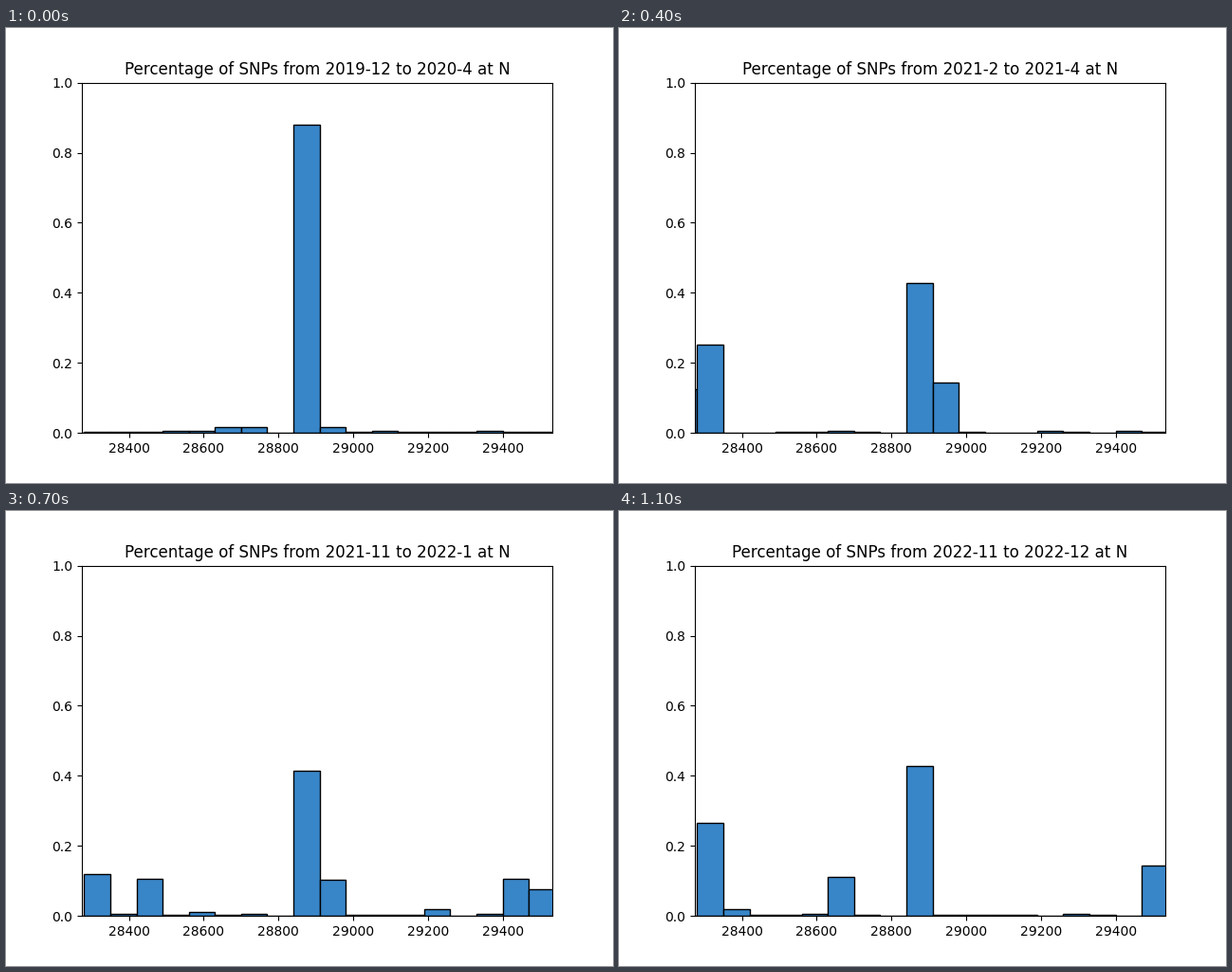
A matplotlib script for the animation above (1.2 s loop, 640 by 480 pixels).

```python
import numpy as np
import matplotlib.pyplot as plt
from matplotlib.animation import FuncAnimation

FRAMES, LOOP_MS = 12, 1200
GENE_START, GENE_END = 28274, 29533
BIN = 70
edges = np.arange(28210, GENE_END, BIN)


def pulse(peak, height):
    """Rise from zero to a peak and fall back within two periods each way."""
    return [(peak - 2, 0), (peak, height), (peak + 2, 0)]


# Main mutation sites: left bin edge -> (step, share) points, linear between
SITES = {
    28210: pulse(4, 0.125),
    28280: [(2, 0), (4, 0.252), (6, 0.033), (8, 0.204), (11, 0.265)],
    28350: [(8, 0), (10, 0.035), (11, 0.02)],
    28420: pulse(6, 0.211),
    28560: pulse(6, 0.022),
    28630: [(0, 0.016), (2, 0), (8, 0), (10, 0.025), (11, 0.111)],
    28700: pulse(0, 0.016),
    28840: [(0, 0.88), (2, 0.983), (4, 0.428), (6, 0.217), (8, 0.61),
            (10, 0.485), (11, 0.428)],
    28910: [(0, 0.016), (2, 0.006), (4, 0.144), (6, 0.206), (8, 0.003), (10, 0)],
    29190: pulse(6, 0.039),
    29400: pulse(6, 0.214),
    29470: [(6, 0.003), (8, 0.152), (10, 0.16), (11, 0.144)],
}


def month(year, m):
    return year * 12 + m - 1


def label(n):
    return f"{n // 12}-{n % 12 + 1}"


def period(step):
    start = month(2020, 2) + 3 * step if step else month(2019, 12)
    end = min(month(2020, 4) + 3 * step, month(2022, 12))
    return f"{label(start)} to {label(end)}"


def shares(step):
    # Rare mutations: a thin scatter, sparsest in the third period
    rng = np.random.default_rng(step)
    density = np.interp(step, [0, 2, 4], [0.8, 0.2, 0.6])
    rare = 0.003 + 0.003 * rng.random(len(edges)) ** 2
    rare *= rng.random(len(edges)) < density
    rare[0] = 0
    main = [np.interp(step, *zip(*SITES.get(edge, [(0, 0)]))) for edge in edges]
    return np.maximum(main, rare)


# A factor of 9 makes the glyph widths whole units at 100 dpi
plt.rcParams.update({"font.family": "DejaVu Sans", "text.hinting_factor": 9})
fig, ax = plt.subplots(figsize=(6.4, 4.8), dpi=100)
ax.set_xlim(GENE_START, GENE_END)
ax.set_ylim(0, 1)
bars = ax.bar(edges, shares(0), width=BIN, align="edge",
              color="#3886c8", edgecolor="black", linewidth=1)
title = ax.set_title("")


def draw(step):
    for bar, share in zip(bars, shares(step)):
        bar.set_height(share)
    title.set_text(f"Percentage of SNPs from {period(step)} at N")
    return [*bars, title]


anim = FuncAnimation(fig, draw, frames=FRAMES, interval=LOOP_MS / FRAMES,
                     repeat=True, repeat_delay=0)
plt.show()
```
